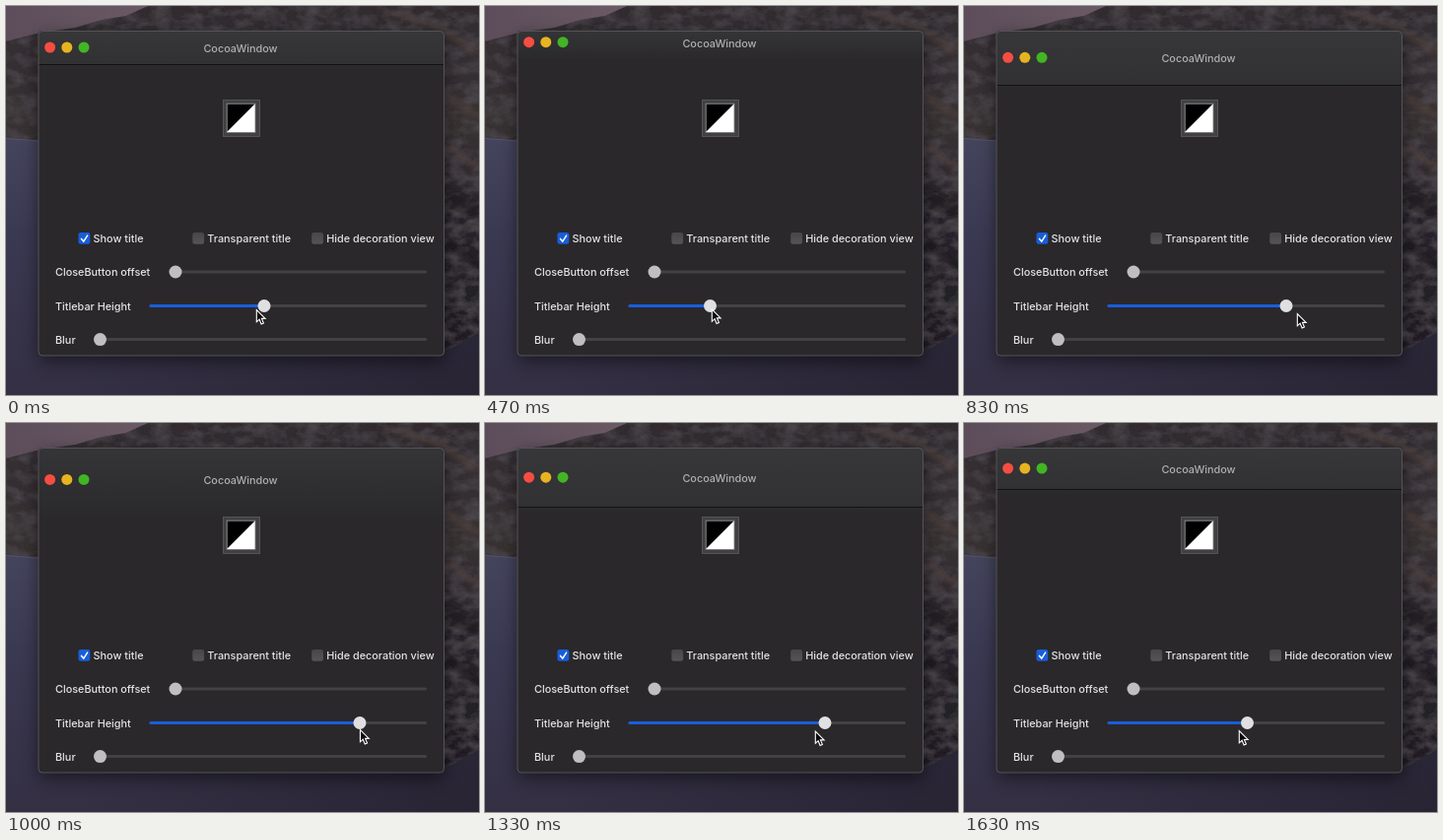
Recreate the animation shown at these times as an HTML page. Size 480 by 395 pixels, loop 1.66 s.

```html
<!DOCTYPE html>
<html lang="en">
<head>
<meta charset="utf-8">
<title>Titlebar height</title>
<style>
  html, body { margin: 0; width: 100%; height: 100%; overflow: hidden; background: #2b2637; }
  svg { display: block; width: 100vw; height: 100vh; }
  text { font: 500 10.85px Inter, "Open Sans", sans-serif; fill: #e4e3e5; }
  #title { fill: #b0afb1; text-anchor: middle; }
</style>
</head>
<body>
<svg viewBox="0 0 480 395">
  <defs>
    <linearGradient id="sky"><stop stop-color="#5d4d5b"/><stop offset=".35" stop-color="#6d5c66"/></linearGradient>
    <linearGradient id="sea" x2="0" y2="1">
      <stop stop-color="#45455e"/><stop offset=".4" stop-color="#3a3952"/>
      <stop offset="1" stop-color="#342f43"/>
    </linearGradient>
    <linearGradient id="dusk"><stop offset=".15" stop-color="#1c1924" stop-opacity="0"/><stop offset="1" stop-color="#1c1924" stop-opacity=".5"/></linearGradient>
    <linearGradient id="land" x2="0" y2="1">
      <stop stop-color="#322c2f"/><stop offset=".35" stop-color="#383133"/>
      <stop offset=".6" stop-color="#28242a"/><stop offset="1" stop-color="#211e27"/>
    </linearGradient>
    <linearGradient id="barFill" x2="0" y2="1"><stop stop-color="#373638"/><stop offset="1" stop-color="#313032"/></linearGradient>
    <linearGradient id="barFade" x2="0" y2="1"><stop stop-color="#353436"/><stop offset="1" stop-color="#2a292b"/></linearGradient>
    <linearGradient id="box" x2="0" y2="1"><stop stop-color="#474648"/><stop offset="1" stop-color="#555456"/></linearGradient>
    <filter id="soft" x="-20%" y="-20%" width="140%" height="140%"><feGaussianBlur stdDeviation="9"/></filter>
    <filter id="haze"><feGaussianBlur stdDeviation="2.5"/></filter>
    <filter id="rough">
      <feTurbulence type="fractalNoise" baseFrequency=".06 .1" numOctaves="4" seed="4"/>
      <feColorMatrix values="0 0 0 0 .07  0 0 0 0 .06  0 0 0 0 .07  2.2 0 0 0 -.8"/>
      <feComposite in2="SourceAlpha" operator="in" result="grain"/>
      <feMerge><feMergeNode in="SourceGraphic"/><feMergeNode in="grain"/></feMerge>
    </filter>
    <clipPath id="frame"><rect x="33" y="25" width="411.5" height="330" rx="4"/></clipPath>
  </defs>

  <!-- Coast at dusk -->
  <rect width="480" height="140" fill="url(#sky)"/>
  <rect y="125" width="480" height="270" fill="url(#sea)"/>
  <rect y="125" width="480" height="270" fill="url(#dusk)"/>
  <path d="M0 36L35 27L70 22L98 14L122 10L144 0H480V332L444 352L380 330L180 150L0 134Z" fill="url(#land)" filter="url(#rough)"/>
  <g filter="url(#haze)" fill="none" stroke-width="6" opacity=".5">
    <path d="M390 6L440 22L480 48M447 90L480 113M446 142L480 165" stroke="#5a473f"/>
    <path d="M447 190L480 210M448 238L480 265" stroke="#171518" stroke-width="9"/>
  </g>
  <path d="M0 134.5L33 137" stroke="#55536a" stroke-width="1.2"/>

  <!-- Window -->
  <rect x="33" y="31" width="412" height="330" rx="8" opacity=".5" filter="url(#soft)"/>
  <g clip-path="url(#frame)">
    <rect x="33" y="25" width="412" height="330" fill="#2a282b"/>
    <rect id="fade" x="33" y="25" width="412" fill="url(#barFade)"/>
    <g id="bar">
      <rect id="barRect" x="33" y="25" width="412" fill="url(#barFill)"/>
      <rect id="edge" x="33" width="412" height="1" fill="#111012"/>
    </g>
  </g>
  <rect x="33" y="25.5" width="411.5" height="329.5" rx="4" fill="none" stroke="#545357"/>
  <g id="heading">
    <circle cx="44.6" cy="-.5" r="5.5" fill="#f64d43"/>
    <circle cx="61.8" cy="-.5" r="5.5" fill="#e6b421"/>
    <circle cx="79" cy="-.5" r="5.5" fill="#42b524"/>
    <text id="title" x="238" y="4.4">CocoaWindow</text>
  </g>

  <!-- Image well -->
  <rect x="220.5" y="95.5" width="37" height="37" fill="#414042" stroke="#555456"/>
  <rect x="224" y="99" width="29" height="29.5" fill="#fff" stroke="#777678" stroke-width=".8"/>
  <path d="M224.5 99.5H252.5L224.5 127.5Z"/>

  <g id="controls"></g>
  <path id="cursor" d="M0 0V12.3L2.8 9.7L4.8 14.5L7.1 13.5L5.1 8.9H8.8Z" fill="#09090a" stroke="#fff" stroke-width="1.1"/>
</svg>
<script>
const $ = id => document.getElementById(id);
const set = (id, attrs) => {
  for (const name in attrs) $(id).setAttribute(name, attrs[name]);
};

const checkbox = (x, label, checked) => `
  <rect x="${x}" y="230" width="11.8" height="11.8" rx="2.2" fill="${checked ? '#185edb' : 'url(#box)'}"/>
  ${checked ? `<path d="M${x + 3} 236.4l2.3 2.7l3.8-6" fill="none" stroke="#fff" stroke-width="1.5" stroke-linecap="round"/>` : ''}
  <text x="${x + 15}" y="240.3">${label}</text>`;

const slider = (y, label, start, knob, shade, id = '') => `
  <text x="50" y="${y + 4.4}">${label}</text>
  <rect x="${start}" y="${y - 1.5}" width="${427 - start}" height="3" rx="1.5" fill="#424143"/>
  ${id && `<rect id="${id}Fill" x="${start}" y="${y - 1.5}" height="3" rx="1.5" fill="#185edb"/>`}
  <circle ${id && `id="${id}Knob"`} cx="${knob}" cy="${y}" r="6.5" fill="${shade}"/>`;

$('controls').innerHTML =
  checkbox(73.5, 'Show title', true) +
  checkbox(189.3, 'Transparent title') +
  checkbox(310.2, 'Hide decoration view') +
  slider(270, 'CloseButton offset', 166, 172, '#bfbec0') +
  slider(304.5, 'Titlebar Height', 145.5, 262, '#e0dfe1', 'height') +
  slider(338.6, 'Blur', 89, 95.5, '#bfbec0');

// Monotone cubic curve through [time, value] points.
function curve(points) {
  const slopes = points.slice(1).map(([t, v], i) => (v - points[i][1]) / (t - points[i][0]));
  const tangents = points.map((_, i) => {
    const a = slopes[i - 1] ?? slopes[i], b = slopes[i] ?? a;
    return a * b > 0 ? 2 * a * b / (a + b) : 0;
  });
  return t => {
    let i = 0;
    while (i < points.length - 2 && t >= points[i + 1][0]) i++;
    const [t0, v0] = points[i], [t1, v1] = points[i + 1];
    const d = t1 - t0, u = (t - t0) / d, w = 1 - u;
    return v0 * w * w * (1 + 2 * u) + v1 * u * u * (3 - 2 * u)
      + d * u * w * (tangents[i] * w - tangents[i + 1] * u);
  };
}

const knobX = curve([[0, 262], [170, 231], [240, 228], [440, 228], [470, 228.5],
  [830, 327], [1000, 359], [1150, 360], [1330, 345], [1630, 287.5], [1660, 281]]);
const cursorX = curve([[0, 254.3], [170, 228.3], [250, 227], [430, 228], [470, 230.3],
  [830, 338.3], [960, 359], [1110, 360], [1330, 335.3], [1630, 279.3], [1660, 274]]);
const cursorY = curve([[0, 308.5], [170, 309], [470, 308], [830, 312.5], [1000, 311.5],
  [1330, 313], [1660, 312.5]]);

function draw(now) {
  // 30 pictures a second, on a 10 ms clock
  const step = Math.floor((Math.floor(now % 1660 / 10) + .34) * .3);
  const t = Math.round(step * 10 / 3) * 10;
  const knob = knobX(t), x = cursorX(t);
  const height = 35 + (knob - 262) * .318;
  // The bar's edge dissolves when the drag slows down.
  const visible = Math.min(1, Math.max(0, (Math.abs(x - knob) - 2) / 4));

  set('heightKnob', { cx: knob });
  set('heightFill', { width: knob - 145.5 });
  set('fade', { height: height + 4 });
  set('barRect', { height });
  set('edge', { y: Math.floor(24.5 + height) });
  set('bar', { opacity: visible });
  set('heading', { transform: `translate(0 ${25 + height / 2})` });
  set('cursor', { transform: `translate(${x} ${cursorY(t)})` });
}

function tick() {
  draw(performance.now());
  requestAnimationFrame(tick);
}
tick();
</script>
</body>
</html>
```
